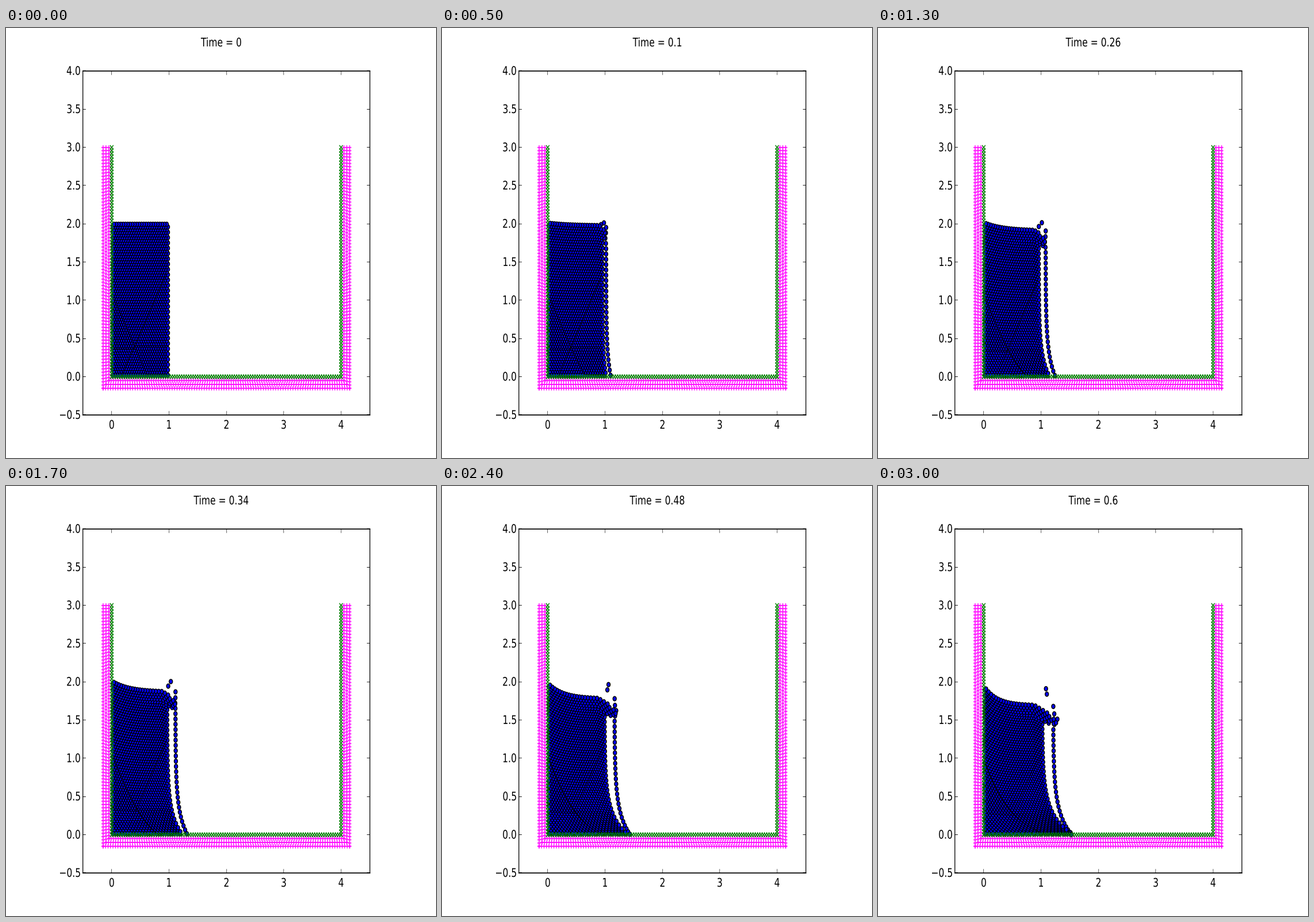
These frames come from a looping animation (748x748 px, 3.1 s). A matplotlib script:

```python
import numpy as np
import matplotlib.pyplot as plt
from matplotlib.animation import FuncAnimation
from matplotlib.collections import EllipseCollection, PolyCollection
from matplotlib.patches import PathPatch
from matplotlib.textpath import TextPath
from matplotlib.transforms import Affine2D

plt.rcParams["font.family"] = "DejaVu Sans"

# An 800 x 600 canvas shown on a square stage.
W, H = 800, 600
UNIT = 480 / 4.5
LEFT, RIGHT, BOTTOM, TOP = 143.33, 676.67, 60, 540
PT = 100 / 72
FONT = 12 * PT
MARK = np.sqrt(20) * PT

fig = plt.figure(figsize=(7.48, 7.48), dpi=100, facecolor="white")
ax = fig.add_axes([0, 0, 1, 1])
ax.set_xlim(0, W)
ax.set_ylim(0, H)
ax.axis("off")


def px(x):
    return LEFT + (np.asarray(x) + 0.5) * UNIT


def py(y):
    return BOTTOM + (np.asarray(y) + 0.5) * UNIT


def snap(v):
    return np.floor(v + 0.01) + 0.5


def bar(x0, y0, x1, y1, width):
    """Stroke as a filled quad, so that it stretches with the canvas."""
    dx, dy = x1 - x0, y1 - y0
    k = width / 2 / np.hypot(dx, dy)
    nx, ny = -dy * k, dx * k
    return [(x0 + nx, y0 + ny), (x1 + nx, y1 + ny),
            (x1 - nx, y1 - ny), (x0 - nx, y0 - ny)]


def add_bars(bars, color, z):
    ax.add_collection(PolyCollection(bars, facecolors=color, edgecolors="none",
                                     linewidths=0, snap=False, zorder=z),
                      autolim=False)


def text_path(s, x, base, align="center"):
    path = TextPath((0, 0), s, size=FONT)
    box = path.get_extents()
    anchor = box.x1 if align == "right" else (box.x0 + box.x1) / 2
    return path.transformed(Affine2D().translate(x - anchor, base))


def add_text(*args):
    patch = PathPatch(text_path(*args), facecolor="black", linewidth=0, zorder=6)
    ax.add_patch(patch)
    return patch


def title_path(t):
    return f"Time = {t:g}", W / 2, H - 25.7


def draw_axes():
    x0, x1, y0, y1 = np.round([LEFT, RIGHT, BOTTOM, TOP])
    size, thin, half = 4 * PT, 0.5 * PT, 0.5 * PT
    bars = [bar(x0 - half, y, x1 + half, y, PT) for y in (y0, y1)]
    bars += [bar(x, y0 - half, x, y1 + half, PT) for x in (x0, x1)]
    for v in range(5):
        x = snap(px(v))
        bars += [bar(x, y0, x, y0 + size, thin), bar(x, y1, x, y1 - size, thin)]
        add_text(str(v), px(v), BOTTOM - size - 13.6)
    for v in np.arange(-0.5, 4.1, 0.5):
        y = snap(py(v))
        bars += [bar(x0, y, x0 + size, y, thin), bar(x1, y, x1 - size, y, thin)]
        add_text(f"{v:.1f}".replace("-", "\u2212"), LEFT - size,
                 py(v) - 5.4, "right")
    add_bars(bars, "black", 5)


def tank(depth):
    """Points of the open box, moved outwards by depth."""
    side = np.linspace(-depth, 3, 76)
    base = np.linspace(-depth, 4 + depth, 101)
    x = np.concatenate([side * 0 - depth, base, side * 0 + 4 + depth])
    y = np.concatenate([side, base * 0 - depth, side])
    return zip(px(x), py(y))


def draw_tank():
    r = MARK / 2
    crosses, pluses = [], []
    for x, y in tank(0):
        crosses += [bar(x - r, y - r, x + r, y + r, PT),
                    bar(x - r, y + r, x + r, y - r, PT)]
    for depth in (0.05, 0.10, 0.15):
        for x, y in tank(depth):
            pluses += [bar(x - r, y, x + r, y, PT), bar(x, y - r, x, y + r, PT)]
    add_bars(crosses, "green", 3)
    add_bars(pluses, "magenta", 4)


# Fluid at rest: a hexagonal lattice, drawn in rings around one seed.
GAP = 0.04
ROW = GAP * np.sqrt(3) / 2
ROWS = 58
EDGE = 0.96


def lattice():
    pts = []
    for k in range(ROWS):
        xs = GAP * np.arange(1, 25) if k % 2 else GAP * (np.arange(25) + 0.5)
        pts += [(x, k) for x in xs]
    x, k = np.array(pts).T
    across, up = (x - 0.4) / GAP, k - 11
    ring = np.round(np.maximum(abs(up), abs(across) + abs(up) / 2))
    order = np.lexsort((np.arctan2(up, across), ring))
    return x[order], k[order]


X0, K = lattice()
Y0 = 0.02 + ROW * K
DEPTH = Y0.max()
SHEET = (X0 > EDGE + 0.01) & (K < ROWS - 2)

# Drops thrown off the corner: column, row, velocity, acceleration.
DROPS = [(0.96, 57, (0.21, 0.25), (0, -1.3)),
         (0.92, 57, (0.05, 0), (0.84, -0.86)),
         (0.98, 56, (0.39, 0), (0, -1.56))]


def body(t):
    """Main block: it sags to the right, spreads at its foot, grows a lip."""
    left = DEPTH + 0.2 * t - 0.45 * t ** 2
    right = DEPTH - 0.68 * t ** 1.6
    bend = 0.4 - 0.3 * t

    # Rows thin out where the body widens, so that its area is kept.
    g = np.linspace(0, 1, 201)
    foot = (0.6 * t + 0.55 * t ** 2) * np.exp(-g * right / 0.28)
    edge = EDGE - 0.08 * t + 0.3 * t ** 2 + foot
    area = np.concatenate([[0], np.cumsum((edge[1:] + edge[:-1]) / 2)])
    level = np.interp(Y0 / DEPTH, area / area[-1], g)

    u = X0 / EDGE
    lip = 0.4 * t * np.clip((level - 0.915) / 0.02, 0, 1)
    x = u * np.interp(level, g, edge) + lip * u ** 4
    sag = (1 - np.exp(-x / bend)) / (1 - np.exp(-0.88 / bend))
    crest = left + (right - left) * np.minimum(sag, 1)
    crest -= 0.45 * min(t / 0.2, 1) * np.maximum(x - 0.88, 0)
    return x, level * crest


def sheet(t, rest):
    """Outer column: it drifts off, falls and runs out along the floor."""
    y = rest - 0.86 * t ** 2 * (1 - np.exp(-rest / 0.3))
    foot = 0.32 * (t / 0.6) ** 0.75 * np.exp(-y / 0.3)
    tip = (0.5 * t ** 2 - 0.18 * t) * np.exp(-((rest - 1.82) / 0.06) ** 2)
    return 0.98 + 0.385 * t + foot + tip, y


def fluid(t):
    x, y = body(t)
    x[SHEET], y[SHEET] = sheet(t, Y0[SHEET])
    for col, row, (vx, vy), (gx, gy) in DROPS:
        one = (K == row) & np.isclose(X0, col)
        x[one] = X0[one] + vx * t + gx * t ** 2 / 2
        y[one] = Y0[one] + vy * t + gy * t ** 2 / 2
    return np.column_stack([px(x), py(y)])


draw_axes()
draw_tank()
title = add_text(*title_path(0))
size = np.full(len(X0), MARK)
water = EllipseCollection(size, size, np.zeros(len(X0)), units="xy",
                          offsets=fluid(0), offset_transform=ax.transData,
                          facecolors="blue", edgecolors="black",
                          linewidths=1.08, zorder=2)
ax.add_collection(water, autolim=False)


def draw(i):
    t = 0.02 * i
    water.set_offsets(fluid(t))
    title.set_path(text_path(*title_path(t)))
    return water, title


anim = FuncAnimation(fig, draw, frames=31, interval=100, repeat=True,
                     repeat_delay=0, init_func=lambda: draw(0), blit=False)
plt.show()
```
